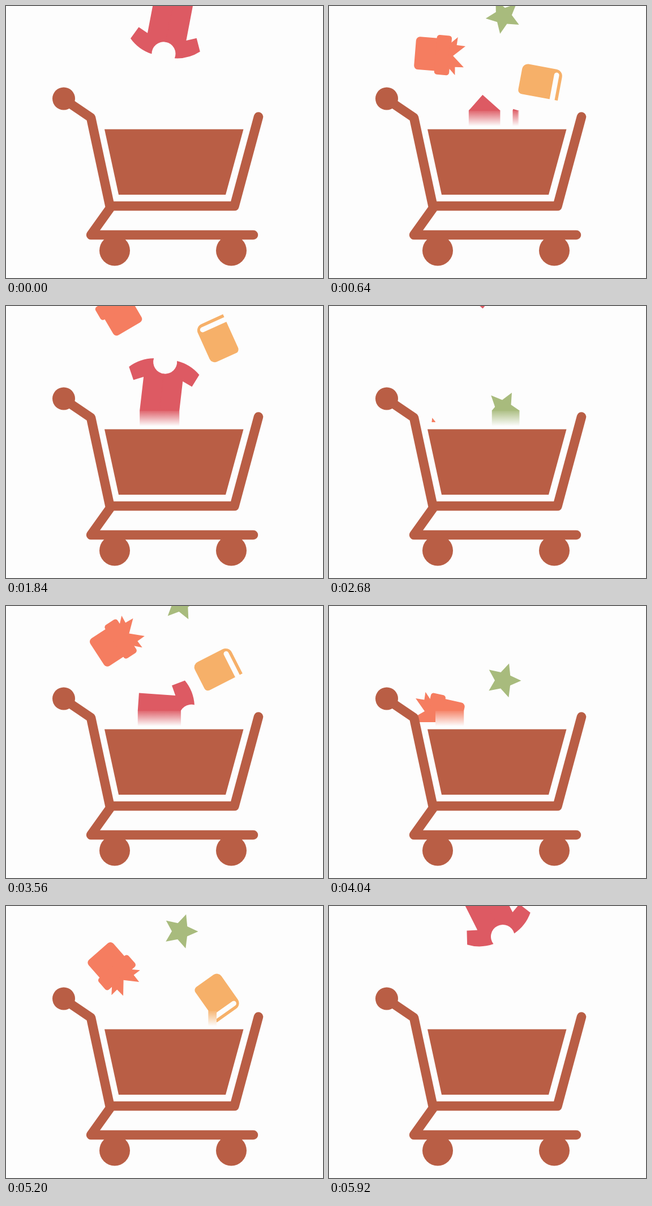
These frames come from a looping animation (560x480 px, 6020 ms). An HTML page with a canvas:

```html
<!DOCTYPE html>
<html>
<head>
<meta charset="utf-8">
<style>
html, body { margin: 0; width: 100%; height: 100%; overflow: hidden; background: #fdfdfd; }
canvas { display: block; }
</style>
</head>
<body>
<canvas id="stage" width="560" height="480"></canvas>
<script>
const g = document.getElementById('stage').getContext('2d');
const BG = '#fdfdfd', CART = '#b95e45';
const LOOP = 6020, STEP = 40, LAST = 5920;
const CYCLE = 1500;  // ms between two rounds of items
const SPIN = 0.47;   // degrees per ms
const FALL = 0.603;  // pixels fallen per degree
const RIM = 205;     // items disappear below this line

g.imageSmoothingEnabled = false;

function box(x, y, w, h, radii) {
  g.beginPath();
  g.roundRect(x, y, w, h, radii);
  g.fill();
}

function disc(x, y, r) {
  g.beginPath();
  g.arc(x, y, r, 0, 7);
  g.fill();
}

// Fill a right half and its mirror image as one shape.
function mirror(half) {
  const whole = new Path2D(half);
  whole.addPath(new Path2D(half), new DOMMatrix([-1, 0, 0, 1, 0, 0]));
  g.fill(whole);
}

function shirt() {
  g.translate(-5.6, -45.5);
  mirror('M20.6-4.2Q45-1 62.5 15.7L52 38L34.8 30.5V95H0V21A21 21 0 0 0 20.6-4.2');
  g.fillRect(-1, 21, 2, 74);
}

function gift() {
  g.translate(4, 0);
  box(-29, 0, 58, 41.3, [0, 0, 7, 7]);
  box(-35, -21.5, 70, 26.5, 5);
  mirror('M0-18V-26L18.7-46.5L19.5-31L33.5-32L20-18');
}

function book() {
  box(-27, -36, 54, 72, [12, 0, 7, 10]);
  g.fillStyle = BG;
  box(-21.5, -30.5, 49.5, 9, [4.5, 0, 0, 4.5]);
}

function star() {
  g.beginPath();
  for (let i = 0; i < 10; i++) {
    const r = i % 2 ? 15 : 31.5, a = i * Math.PI / 5;
    g.lineTo(r * Math.cos(a), r * Math.sin(a));
  }
  g.fill();
}

// Every item turns at one rate and falls in proportion to its turn.
function drop(item, color, angle, x, lag, turn) {
  g.save();
  g.translate(x, angle * FALL - 76.5 - lag);
  g.rotate((angle + turn) * Math.PI / 180);
  g.fillStyle = color;
  item();
  g.restore();
}

function drawItems(t) {
  g.save();
  g.beginPath();
  g.rect(0, 0, 560, RIM);
  g.clip();
  for (let n = 0; n < 5; n++) {
    const start = n * CYCLE - 406 - n % 2 * 34;
    const angle = (t - start) * SPIN;
    if (angle < 0) continue;
    drop(shirt, '#dd5a63', angle, 281.5, 0, 0);
    drop(book, '#f6b069', angle, 373.5, 86, -31);
    drop(gift, '#f57d60', angle, 193.5, 138, -37);
    drop(star, '#a8bb7d', angle, 308, 202, -31);
  }
  g.restore();
}

// Stretch the row above the haze downwards and fade it out.
function drawHaze(x, y, w, h) {
  g.drawImage(g.canvas, x, y - 1, w, 1, x, y, w, h);
  const fade = g.createLinearGradient(0, y, 0, y + h);
  fade.addColorStop(0, 'rgba(253,253,253,0.08)');
  fade.addColorStop(1, BG);
  g.fillStyle = fade;
  g.fillRect(x, y, w, h);
}

function drawCart() {
  g.fillStyle = g.strokeStyle = CART;
  g.lineWidth = 16.5;
  g.lineCap = g.lineJoin = 'round';
  g.stroke(new Path2D('M102 164.5L150 197L183.5 353H403.5L446 195.5M186.5 353L150 404H437'));
  g.fill(new Path2D('M174 217.5H419.5L388 333H199'));
  disc(102, 163.5, 20);
  disc(192, 431.5, 27);
  disc(398, 431.5, 27);
}

function frame(now) {
  const t = Math.min(Math.floor(now % LOOP / STEP) * STEP, LAST);
  g.fillStyle = BG;
  g.fillRect(0, 0, 560, 480);
  drawItems(t);
  drawHaze(188, 185, 184, 27);
  drawCart();
  requestAnimationFrame(frame);
}
frame(performance.now());
</script>
</body>
</html>
```
